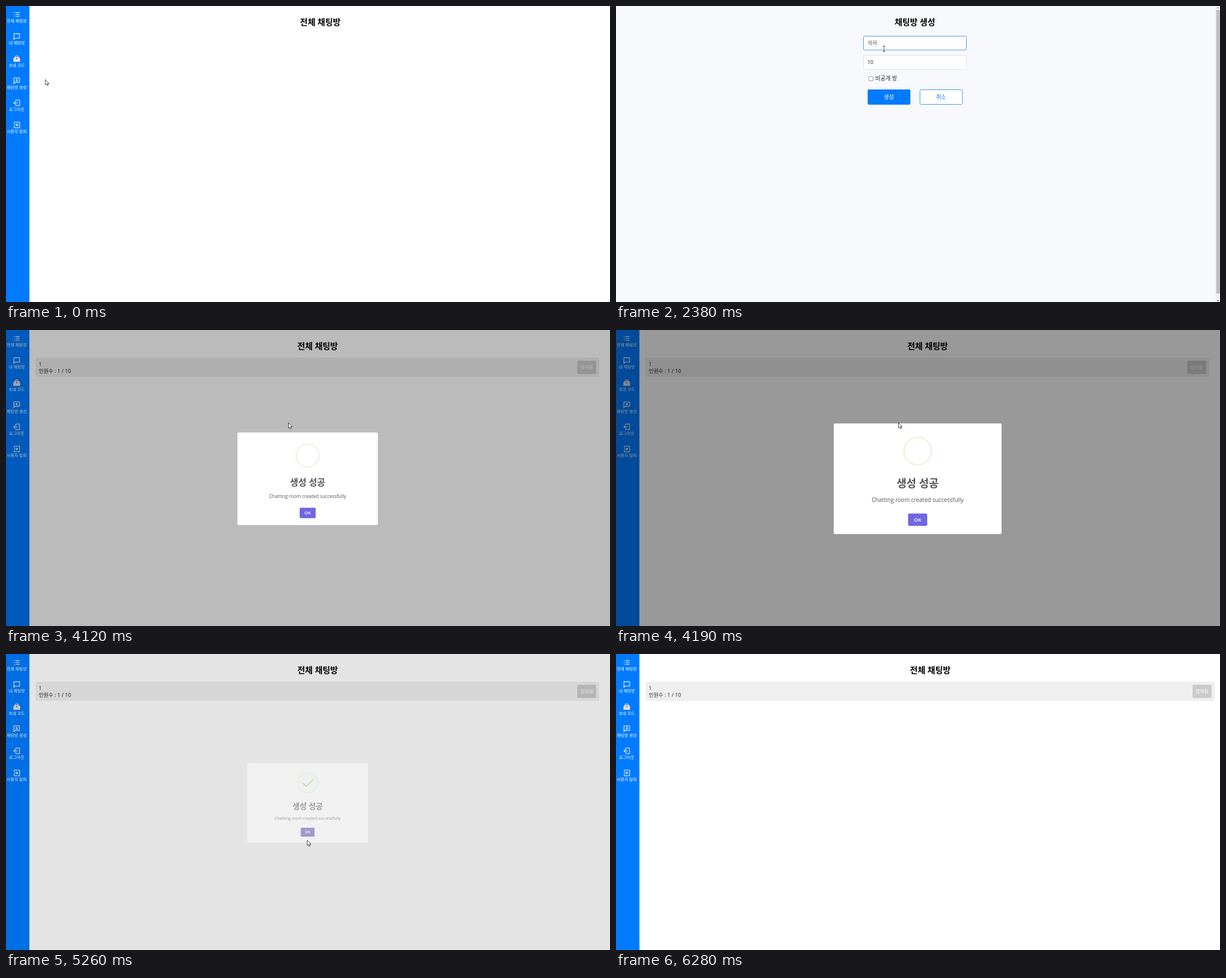
Animation of 1068x525 px, one loop 7.59 s. Source, as an HTML page with a canvas:

```html
<!DOCTYPE html>
<html lang="ko">
<head>
<meta charset="utf-8">
<title>채팅방 생성</title>
<style>
  html, body { margin: 0; width: 100%; height: 100%; overflow: hidden; background: #fff; }
  canvas { display: block; }
</style>
</head>
<body>
<canvas id="stage" width="1068" height="525"></canvas>
<script>
const W = 1068, H = 525, LOOP = 7590;
const FONT = '"Noto Sans", "Noto Sans CJK KR", "Noto Sans CJK JP", "Noto Sans CJK", sans-serif';
const BLUE = '#007bff', INK = '#212529', EM = 8.9;

const T = {
  form: 1260, focus: 1850, typed: 3260, press: 3980, noScrollbar: 4050,
  popup: 4082, hoverOk: 4640, pressOk: 5190, close: 5217, closed: 5367
};

const stage = document.getElementById('stage').getContext('2d');
const layerCanvas = document.createElement('canvas');
layerCanvas.width = W;
layerCanvas.height = H;
const layer = layerCanvas.getContext('2d');
let ctx = stage;

const clamp = v => Math.max(0, Math.min(1, v));
const mix = (a, b, p) => a + (b - a) * p;
const smooth = p => p * p * (3 - 2 * p);

// CSS "ease": cubic-bezier(.25, .1, .25, 1)
function ease(x) {
  if (x <= 0 || x >= 1) return clamp(x);
  const curve = (a, b, u) => 3 * a * u * (1 - u) ** 2 + 3 * b * u * u * (1 - u) + u ** 3;
  let lo = 0, hi = 1;
  for (let i = 0; i < 20; i++) {
    const mid = (lo + hi) / 2;
    if (curve(.25, .25, mid) < x) lo = mid; else hi = mid;
  }
  return curve(.1, 1, lo);
}

// Each key is [position, ...values]
function tween(keys, at, timing) {
  if (at <= keys[0][0]) return keys[0].slice(1);
  for (let i = 1; i < keys.length; i++) {
    const a = keys[i - 1], b = keys[i];
    if (at < b[0]) {
      const p = timing((at - a[0]) / (b[0] - a[0]));
      return a.slice(1).map((v, n) => mix(v, b[n + 1], p));
    }
  }
  return keys[keys.length - 1].slice(1);
}

function text(str, x, cy, size, color, align = 'left', weight = 400, font = FONT) {
  ctx.font = `${weight} ${size}px ${font}`;
  ctx.textAlign = align;
  ctx.fillStyle = color;
  ctx.fillText(str, x, cy + size * .365);
}

function rect(x, y, w, h, color) {
  ctx.fillStyle = color;
  ctx.fillRect(x, y, w, h);
}

function box(x, y, w, h, r, fill, stroke, line = 1) {
  ctx.beginPath();
  ctx.roundRect(x, y, w, h, r);
  if (fill) { ctx.fillStyle = fill; ctx.fill(); }
  if (stroke) { ctx.strokeStyle = stroke; ctx.lineWidth = line; ctx.stroke(); }
}

// Sidebar icons on a 24-unit grid
const BUBBLE = 'M3 21V4Q3 3 4 3H20Q21 3 21 4V16Q21 17 20 17H7Z';
const ICONS = [
  'M8 6H21M8 12H21M8 18H21M3 6H5M3 12H5M3 18H5',
  BUBBLE,
  null,
  BUBBLE + 'M12 6V14M8 10H16',
  'M9 8V4Q9 3 10 3H20Q21 3 21 4V20Q21 21 20 21H10Q9 21 9 20V16M15 12H3M7 8L3 12L7 16',
  'M4 8V4Q4 3 5 3H20Q21 3 21 4V20Q21 21 20 21H5Q4 21 4 20V16M3 12H15M11 8L15 12L11 16'
].map(d => d && new Path2D(d));
const LABELS = ['전체 채팅방', '내 채팅방', '초대 코드', '채팅방 생성', '로그아웃', '사용자 탈퇴'];

function bagIcon(x, y) {
  box(x - 2.5, y - 5, 5, 4, 1.5, null, '#d5d5d8', 1.2);
  ctx.beginPath();
  ctx.moveTo(x - 4, y - 3);
  ctx.lineTo(x + 4, y - 3);
  ctx.lineTo(x + 6, y);
  ctx.lineTo(x + 6, y + 5.5);
  ctx.lineTo(x - 6, y + 5.5);
  ctx.lineTo(x - 6, y);
  ctx.fillStyle = '#d9dbdf';
  ctx.fill();
  ctx.beginPath();
  ctx.arc(x, y, 2.6, 0, 7);
  ctx.fillStyle = '#f4f4f4';
  ctx.fill();
  rect(x - 1.6, y - .6, 3.2, 1.2, '#77706c');
  rect(x - .6, y - 1.6, 1.2, 3.2, '#77706c');
}

function sidebar() {
  rect(0, 0, 41.4, H, BLUE);
  LABELS.forEach((label, i) => {
    const y = 15 + i * 39.2;
    if (ICONS[i]) {
      ctx.save();
      ctx.translate(12.3, y - 6.7);
      ctx.scale(.556, .556);
      ctx.strokeStyle = '#fff';
      ctx.lineWidth = 2;
      ctx.stroke(ICONS[i]);
      ctx.restore();
    } else bagIcon(19, y);
    text(label, 19, y + 11.5, 7.3, '#fff', 'center');
  });
}

function listPage(t) {
  const hasRoom = t >= T.popup;
  const shift = hasRoom && t < T.closed ? 9.4 : 0;
  rect(0, 0, W, H, '#fff');
  sidebar();
  text('전체 채팅방', 555.7 - shift / 2, 28.5, 14.75, '#000', 'center', 700);
  if (!hasRoom) return;
  box(52.5, 49, 1006 - shift, 34, 2.5, '#efefef');
  text('1', 58, 61, 9, INK);
  text('인원수 : 1 / 10', 58, 72.5, 9.25, INK);
  box(1019.5 - shift, 54.5, 33.5, 23.5, 2.5, '#cacaca');
  text('참여됨', 1036.2 - shift, 66.5, 8.2, '#fff', 'center');
}

function triangle(x, y, half, color) {
  ctx.beginPath();
  ctx.moveTo(x - Math.abs(half), y + half / 2);
  ctx.lineTo(x + Math.abs(half), y + half / 2);
  ctx.lineTo(x, y - half / 2);
  ctx.fillStyle = color;
  ctx.fill();
}

function scrollbar() {
  rect(1060, 0, 8, H, '#f1f1f1');
  rect(1061.3, 7, 6.7, 503, '#c1c1c1');
  triangle(1064.5, 3, 2.2, '#a3a3a3');
  triangle(1064.5, 523, -2.2, '#505050');
}

function formPage(t, mouse) {
  const focused = t >= T.focus && t < T.press;
  rect(0, 0, W, H, '#fff');
  rect(0, 0, 1060, H, '#f8f9fc');
  if (t < T.noScrollbar) scrollbar();
  text('채팅방 생성', 528.5, 28.5, 14.75, '#000', 'center', 700);

  box(437.5, 53.5, 182, 24.5, 2.2, '#fff', focused ? '#4b96dc' : '#dee2e6');
  box(437.5, 87.5, 182, 25, 2.2, '#fff', '#dee2e6');
  if (t < T.typed) text('제목', 444.7, 65.5, 9.6, '#6c757d');
  else text('1', 444.7, 65.7, 9, INK);
  text('10', 444.7, 99.8, 9, INK);

  const blinkStart = t < T.typed ? T.focus : T.typed;
  if (focused && Math.floor((t - blinkStart) / 530) % 2 === 0)
    rect(t < T.typed ? 445 : 449, 61, 1, 10, '#222');

  const overNumber = mouse.x > 437 && mouse.x < 620 && mouse.y > 87 && mouse.y < 113;
  if (overNumber) {
    rect(603, 92, 8, 15, '#efefef');
    triangle(607, 96, 2, '#505050');
    triangle(607, 103, -2, '#505050');
  }

  box(447, 125.2, 7.6, 7.6, 1.4, '#fff', '#767676', .8);
  text('비공개 방', 458.5, 128.3, 9.75, INK);
  box(445, 148, 75.5, 27, 2.2, BLUE);
  text('생성', 482.4, 161.7, 9.7, '#fff', 'center');
  box(537.5, 148.5, 75, 26, 2.2, '#fff', '#3b98ff');
  text('취소', 574.8, 161.7, 9.7, BLUE, 'center');
}

// Bar of the check mark: box given in em inside a 5em icon
function bar(left, top, width, angle) {
  if (width < .02) return;
  const h = .3125;
  ctx.save();
  ctx.translate((left + width / 2 - 2.5) * EM, (top + h / 2 - 2.5) * EM);
  ctx.rotate(angle);
  box(-width / 2 * EM, -h / 2 * EM, width * EM, h * EM, 1, '#a5dc86');
  ctx.restore();
}

function checkMark(p) {
  const tip = tween([[.54, .0625, 1.1875, 0], [.7, -.375, 2.1875, 3.125],
    [.84, 1.3125, 3, 1.0625], [1, .8125, 2.8125, 1.5625]], p, ease);
  const [right, top, width] = tween([[.65, 2.875, 3.375, 0],
    [.84, 0, 2.1875, 3.4375], [1, .5, 2.375, 2.9375]], p, ease);
  bar(...tip, Math.PI / 4);
  bar(5 - right - width, top, width, -Math.PI / 4);
}

function popup(t) {
  const age = t - T.popup;
  const gone = ease((t - T.close) / 150);
  const shade = .4 * ease(age / 100) * (1 - ease((t - T.close) / 100));
  rect(0, 0, W, H, `rgba(0,0,0,${shade})`);

  const [grow] = tween([[0, .7], [.45, 1.05], [.8, .95], [1, 1]], age / 300, ease);
  const scale = grow * (1 - gone / 2);

  ctx = layer;
  ctx.clearRect(0, 0, W, H);
  ctx.save();
  ctx.translate(533.4, 263.9);
  ctx.scale(scale, scale);
  box(-142.4, -94.1, 284.8, 188.2, 2.8, '#fff');
  ctx.save();
  ctx.translate(0, -47.3);
  ctx.beginPath();
  ctx.arc(0, 0, 23.3, 0, 2 * Math.PI);
  ctx.strokeStyle = 'rgba(165,220,134,.3)';
  ctx.lineWidth = 2.3;
  ctx.stroke();
  checkMark(age / 750);
  ctx.restore();
  text('생성 성공', 0, 7.7, 18.1, '#545454', 'center', 600);
  text('Chatting room created successfully', 0, 36, 9.6, '#545454', 'center', 400, '"Open Sans", sans-serif');
  box(-16.2, 59, 32.4, 21.2, 2.2, '#7066e0');
  if (t >= T.hoverOk) box(-16.2, 59, 32.4, 21.2, 2.2, `rgba(0,0,0,${t >= T.pressOk ? .2 : .1})`);
  text('OK', 0, 69.3, 9, '#fff', 'center', 600, '"Open Sans", sans-serif');
  ctx.restore();

  ctx = stage;
  ctx.globalAlpha = 1 - gone;
  ctx.drawImage(layerCanvas, 0, 0);
  ctx.globalAlpha = 1;
}

// Pointer moves: start, end, from, to, sideways and vertical bow
const MOVES = [
  [260, 730, 69.5, 130.5, 29.8, 133.3, 0, -6],
  [1390, 1850, 29.8, 133.3, 473, 71, 0, 0],
  [2120, 2330, 473, 71, 474, 76, 0, 0],
  [2980, 3510, 474, 76, 499.5, 164.5, 0, 3],
  [4250, 4720, 499.5, 164.5, 532.7, 330.3, 0, 0],
  [5740, 6270, 532.7, 330.3, 1003, 527, -25, 0]
];

function pointerAt(t) {
  let x = MOVES[0][2], y = MOVES[0][3];
  for (const [start, end, x0, y0, x1, y1, bowX, bowY] of MOVES) {
    if (t < start) break;
    const p = smooth(clamp((t - start) / (end - start)));
    const bow = Math.sin(Math.PI * p);
    x = mix(x0, x1, p) + bow * bowX;
    y = mix(y0, y1, p) + bow * bowY;
  }
  return { x, y };
}

const ARROW = new Path2D('M0 0V9.4L2.2 7.5L3.7 10.8L5.2 10.2L3.8 7H6.6Z');

function pointer({ x, y }, onForm) {
  const overInput = onForm && x > 437 && x < 620 && (y > 53 && y < 78.5 || y > 87 && y < 113);
  ctx.save();
  ctx.translate(x, y);
  ctx.lineWidth = .8;
  ctx.strokeStyle = '#1c1c1c';
  if (overInput) {
    ctx.stroke(new Path2D('M-2.2 -4.7H2.2M0 -4.7V4.7M-2.2 4.7H2.2'));
  } else {
    ctx.fillStyle = '#fff';
    ctx.fill(ARROW);
    ctx.stroke(ARROW);
  }
  ctx.restore();
}

function draw(t) {
  const mouse = pointerAt(t);
  const onForm = t >= T.form && t < T.popup;
  if (onForm) formPage(t, mouse); else listPage(t);
  if (t >= T.popup && t < T.closed) popup(t);
  if (t < 6270) pointer(mouse, onForm);
}

const begin = performance.now();
function tick() {
  draw((performance.now() - begin) % LOOP);
  requestAnimationFrame(tick);
}
tick();
</script>
</body>
</html>
```
